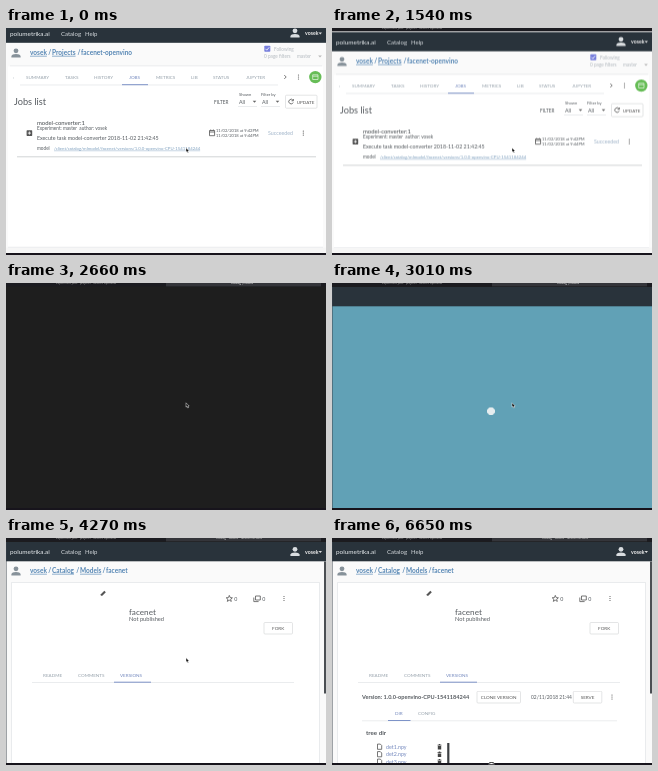
An HTML page for the animation above (6.72 s loop, 320x227 px).

```html
<!DOCTYPE html>
<html lang="en">
<head>
<meta charset="utf-8">
<title>Model catalog</title>
<style>
  html, body { margin: 0; width: 100%; height: 100%; overflow: hidden; background: #1e1e1e; }
  svg { display: block; width: 100vw; height: 100vh; }
  text { font-family: Lato, "Open Sans", sans-serif; font-size: 5.3px; fill: #555a5f; }
  .brand { font-size: 6.4px; fill: #e9edf0; }
  .nav { font-size: 6px; fill: #d5dade; }
  .user { font-size: 5.2px; font-weight: 700; fill: #eee; }
  .crumb { font-size: 6.5px; font-weight: 700; fill: #5586b4; }
  .tab { font-size: 4.6px; fill: #95a0aa; }
  .on { fill: #7287bd; }
  .h1 { font-size: 9.2px; }
  .h2 { font-size: 5.9px; fill: #43484c; }
  .small { font-size: 4.7px; }
  .tiny { font-size: 4.1px; }
  .pale { fill: #b4bac0; }
  .link { font-size: 4.3px; fill: #7fa0bf; text-decoration: underline; }
  .btn { font-size: 4.6px; text-anchor: middle; fill: #555; }
  .title { font-size: 3px; fill: #a5a5a5; }
  .box { fill: #fff; stroke: #d2d4d6; stroke-width: .6; }
  .rule { stroke: #dcdfe2; stroke-width: .6; }
  .ink { stroke: #7e93c8; stroke-width: 1; }
  .line { fill: none; stroke: #555; stroke-width: .8; }

  .t { animation: 6.72s step-end infinite both; }
  .jobs { animation-name: jobs; }
  .shift { animation-name: shift; }
  .strip { animation-name: strip; }
  .newtab { animation-name: newtab; }
  .name1 { animation-name: name1; }
  .name2 { animation-name: name2; }
  .app { animation-name: app; }
  .splash { animation-name: splash; }
  .spin { animation-name: spin; transform-origin: 159px 128px; }
  .load { animation-name: load; }
  .top { animation-name: top; }
  .card { animation-name: card; }
  .version { animation-name: version; }
  .halo { animation-name: halo; }
  .tap { animation-name: tap; }
  .cursor { animation-name: cursor; }
  .edge { animation-name: edge; }

  @keyframes jobs { 0% { opacity: 1 } 23.958%, 100% { opacity: 0 } }
  @keyframes shift { 0% { transform: translateY(-8.5px) } 21.874%, 100% { transform: none } }
  @keyframes strip { 0% { opacity: 0 } 21.874%, 100% { opacity: 1 } }
  @keyframes newtab { 0% { opacity: 0 } 23.958%, 100% { opacity: 1 } }
  @keyframes name1 { 0% { opacity: 0 } 39.583% { opacity: 1 } 55.208%, 100% { opacity: 0 } }
  @keyframes name2 { 0% { opacity: 0 } 55.208%, 100% { opacity: 1 } }
  @keyframes app { 0% { opacity: 0 } 44.791%, 100% { opacity: 1 } }
  @keyframes splash {
    0% { opacity: 1 }
    47.916% { opacity: 1; animation-timing-function: steps(4, jump-end) }
    52.083%, 100% { opacity: 0 }
  }
  @keyframes spin {
    0% { transform: none }
    44.791% { transform: none; animation-timing-function: steps(7, jump-end) }
    52.083%, 100% { transform: rotate(180deg) scale(1.25) }
  }
  @keyframes load { 0% { opacity: 0 } 52.083% { opacity: 1 } 55.208%, 100% { opacity: 0 } }
  @keyframes top {
    0% { opacity: 0 }
    54.166% { opacity: 0; animation-timing-function: steps(3, jump-end) }
    57.291%, 100% { opacity: 1 }
  }
  @keyframes card {
    0% { opacity: 0 }
    55.208% { opacity: 0; animation-timing-function: steps(8, jump-end) }
    63.541%, 100% { opacity: 1 }
  }
  @keyframes version {
    0% { opacity: 0; transform: translateY(10px) }
    67.708% { opacity: 0; transform: translateY(10px); animation-timing-function: steps(10, jump-end) }
    78.125%, 100% { opacity: 1; transform: none }
  }
  @keyframes halo { 0% { opacity: 0 } 8.333% { opacity: .12 } 9.375% { opacity: .22 } 12.5%, 100% { opacity: 0 } }
  @keyframes tap { 0% { opacity: 0 } 19.791% { opacity: .18 } 21.874%, 100% { opacity: 0 } }
  @keyframes cursor {
    0% { transform: none }
    67.708% { transform: none; animation-timing-function: steps(10, jump-end) }
    78.125% { transform: translate(-12px, 104px) }
    79.166%, 100% { transform: translate(-12px, 112px) }
  }
  @keyframes edge { 0% { opacity: 0 } 98.958%, 100% { opacity: 1 } }
</style>
</head>
<body>
<svg viewBox="0 0 320 227" preserveAspectRatio="none">
  <defs>
    <g id="person">
      <circle cy="-2.2" r="2.4"/>
      <path d="M-4.6 4.6V3Q-4 .9 0 .9T4.6 3V4.6Z"/>
    </g>
    <g id="dots" fill="#555"><circle cy="-2" r=".6"/><circle r=".6"/><circle cy="2" r=".6"/></g>
    <path id="down" d="M-1.8-1H1.8L0 1Z" fill="#666"/>
    <g id="bar">
      <rect y="4" width="320" height="19.3" fill="#29333b"/>
    </g>
    <g id="menu">
      <text class="brand" x="4" y="16">polumetrika.ai</text>
      <text class="nav" x="55" y="16">Catalog</text>
      <text class="nav" x="79" y="16">Help</text>
      <use href="#person" x="289" y="13.5" fill="#d9dde0"/>
      <text class="user" x="299" y="15.6">vosek</text>
      <path d="M312.6 13H316L314.3 15Z" fill="#ddd"/>
    </g>
    <g id="file">
      <path class="line" d="M-2-2.6H.8L2.2-1.2V2.6H-2Z"/>
      <path d="M58-2H62V-1.2H58ZM58.3-.7H61.7V2.8H58.3ZM59.2-2.7H60.8V-2H59.2Z" fill="#444"/>
    </g>
  </defs>

  <rect width="320" height="227" fill="#1e1e1e"/>

  <g class="t jobs">
    <rect width="320" height="227" fill="#fafafa"/>
    <g class="t shift">
      <use href="#bar"/><use href="#menu"/>
      <use href="#person" x="10" y="33.5" fill="#87929a"/>
      <text class="crumb" y="35.3"><tspan x="24" text-decoration="underline">vosek</tspan><tspan x="42.3">/</tspan><tspan x="46" text-decoration="underline">Projects</tspan><tspan x="71.5">/</tspan><tspan x="75">facenet-openvino</tspan></text>
      <rect x="258.3" y="26.3" width="6" height="6" rx=".8" fill="#777fdc"/>
      <path d="M259.5 29.3L260.8 30.7 263.2 27.8" fill="none" stroke="#fff" stroke-width=".8"/>
      <text class="small pale" x="268" y="31">Following</text>
      <text class="small pale" x="258" y="38.5">0 page filters</text>
      <text class="small pale" x="291" y="38.5">master</text>
      <use href="#down" x="314" y="37" opacity=".45"/>
      <path class="rule" d="M4 46.5H316"/>
      <rect x="2" y="47" width="315" height="180" fill="#fff"/>
      <g class="tab">
        <text class="tab" x="7" y="59">‹</text>
        <text class="tab" x="20" y="59">SUMMARY</text>
        <text class="tab" x="59" y="59">TASKS</text>
        <text class="tab" x="88" y="59">HISTORY</text>
        <text class="tab on" x="123" y="59">JOBS</text>
        <text class="tab" x="150" y="59">METRICS</text>
        <text class="tab" x="185" y="59">LIB</text>
        <text class="tab" x="207" y="59">STATUS</text>
        <text class="tab" x="240" y="59">JUPYTER</text>
      </g>
      <path class="line" d="M278.3 55.6L280.2 57.5 278.3 59.4"/>
      <use href="#dots" x="292.5" y="57.5"/>
      <circle cx="309.3" cy="57.6" r="6.2" fill="#67bd57"/>
      <path d="M306.7 55.3H312V60H306.7ZM306.7 56.7H312" fill="none" stroke="#e9f7e6" stroke-width=".7"/>
      <path class="rule" d="M14 65.5H272"/><path class="ink" d="M116 65.2H142"/>

      <text class="h1" x="8" y="85">Jobs list</text>
      <text class="small" x="208" y="84">FILTER</text>
      <text class="tiny" x="233" y="76.5">Shown</text>
      <text x="233" y="84">All</text><use href="#down" x="248.5" y="82.3"/>
      <text class="tiny" x="255" y="76.5">Filter by</text>
      <text x="256" y="84">All</text><use href="#down" x="271.5" y="82.3"/>
      <path class="rule" d="M232 87H251M255 87H274"/>
      <rect class="box" x="279.5" y="75.7" width="31.5" height="13" rx="1"/>
      <path class="line" d="M287 80.8A2.3 2.3 0 1 0 287.2 83M287.4 79.5V81.3H285.5"/>
      <text class="btn" x="299.5" y="84">UPDATE</text>

      <text class="h2" x="31" y="105">model-converter:1</text>
      <text class="small" x="31" y="110.3">Experiment: master&#160; author: vosek</text>
      <text x="31" y="120.8">Execute task model-converter 2018-11-02 21:42:45</text>
      <text class="small" x="31" y="130.2">model</text>
      <text class="link" x="48" y="130.2">/client/catalog/mlmodel/facenet/versions/1.0.0-openvino-CPU-1541184244</text>
      <rect x="20.6" y="110.8" width="5.6" height="5.6" rx=".6" fill="#555"/>
      <path d="M23.4 112V115.2M21.8 113.6H25" stroke="#fff" stroke-width=".8"/>
      <path class="line" d="M203.5 111H208.6V116.2H203.5ZM203.5 112.5H208.6M204.7 110V111M207.4 110V111"/>
      <text class="tiny" x="210" y="112.7">11/02/2018 at 9:42PM</text>
      <text class="tiny" x="210" y="117.4">11/02/2018 at 9:44PM</text>
      <text x="262" y="115.2" fill="#9fb3c8" style="fill:#9fb3c8">Succeeded</text>
      <use href="#dots" x="297.3" y="113.6"/>
      <path d="M11 137.3H310" stroke="#c6c9cc" stroke-width=".8"/>
    </g>
    <path class="rule" d="M2 219.3H317"/>
    <rect y="219.7" width="320" height="5" fill="#f6f6f6"/>
    <circle class="t halo" cx="180" cy="120" r="9.5" fill="#555"/>
    <circle class="t tap" cx="180.5" cy="120" r="7" fill="#555"/>
  </g>

  <g class="t app">
    <rect y="4" width="320" height="221" fill="#f0f0f0"/>
    <g class="t top">
      <rect y="23" width="320" height="202" fill="#fafafa"/>
      <use href="#person" x="10" y="33" fill="#87929a"/>
      <text class="crumb" y="34.8"><tspan x="24" text-decoration="underline">vosek</tspan><tspan x="42.3">/</tspan><tspan x="46" text-decoration="underline">Catalog</tspan><tspan x="70.2">/</tspan><tspan x="74" text-decoration="underline">Models</tspan><tspan x="96.5">/</tspan><tspan x="100">facenet</tspan></text>
    </g>
    <g class="t card">
      <rect x="5.5" y="44.5" width="308" height="183" fill="#fff"/>
      <path class="rule" d="M5.5 227V44.5H313.5V227" fill="none"/>
      <path d="M94.8 57.7V56.2L98.3 52.7 99.8 54.2 96.3 57.7Z" fill="#555"/>
      <text x="123" y="77" style="font-size:8.2px">facenet</text>
      <text x="123" y="83.4" style="font-size:5.7px">Not published</text>
      <path class="line" d="M223.3 57.4L224.2 59.6 226.4 59.8 224.7 61.2 225.3 63.4 223.3 62.2 221.3 63.4 221.9 61.2 220.2 59.8 222.4 59.6Z"/>
      <text x="228.3" y="62.5">0</text>
      <path class="line" d="M249.5 58H254.3V62H249.5ZM247.8 59.5V63.6H252.6"/>
      <text x="256.3" y="62.5">0</text>
      <use href="#dots" x="278" y="60.5"/>
      <rect class="box" x="258" y="84.5" width="28.5" height="11.5" rx="1"/>
      <text class="btn" x="272.2" y="92">FORK</text>
      <text class="tab" x="37" y="139">README</text>
      <text class="tab" x="72" y="139">COMMENTS</text>
      <text class="tab on" x="114" y="139">VERSIONS</text>
      <path class="rule" d="M26 144.5H288"/><path class="ink" d="M108 144.2H145"/>
      <rect x="318" y="23.5" width="2" height="132" fill="#4b4f53"/>
    </g>
    <g class="t version">
      <text x="30" y="161" style="font-size:5.6px;font-weight:700">Version: 1.0.0-openvino-CPU-1541184244</text>
      <rect class="box" x="145" y="153.3" width="43.5" height="11.7" rx="1"/>
      <text class="btn" x="166.7" y="161">CLONE VERSION</text>
      <text x="199" y="161" style="font-size:4.9px">02/11/2018 21:44</text>
      <rect class="box" x="241.3" y="153.3" width="28.5" height="11.7" rx="1"/>
      <text class="btn" x="255.5" y="161">SERVE</text>
      <use href="#dots" x="280" y="159"/>
      <text class="tab on" x="63" y="177">DIR</text>
      <text class="tab" x="86" y="177">CONFIG</text>
      <path class="rule" d="M30 182.8H285"/><path class="ink" d="M56 182.5H78.5"/>
      <text x="34" y="197" style="font-size:6.2px;font-weight:700">tree dir</text>
      <use href="#file" x="47.5" y="208.7"/><text class="on" x="54" y="210.7">det1.npy</text>
      <use href="#file" x="47.5" y="216.2"/><text class="on" x="54" y="218.2">det2.npy</text>
      <use href="#file" x="47.5" y="223.7"/><text class="on" x="54" y="225.7">det3.npy</text>
      <rect x="115.2" y="205" width="2.2" height="22" fill="#3c3f42"/>
    </g>
    <g class="t splash">
      <rect y="23" width="320" height="202" fill="#61a1b6"/>
      <path class="t spin" d="M157.3 124.3H160.7L163 126.7V129.6L160.7 132H157.3L155 129.6V126.7Z" fill="#e6edef"/>
    </g>
    <use href="#bar"/>
    <g class="t top"><use href="#menu"/></g>
    <rect class="t load" y="3.5" width="320" height="1.6" fill="#648fb5"/>
    <path d="M.3 4V225" stroke="#39424a" stroke-width=".6"/>
  </g>

  <g class="t strip">
    <rect width="320" height="3.4" fill="#1b1b20"/>
    <text class="title" x="50" y="1.2">Experiment jobs - projects - facenet-openvino</text>
    <g class="t newtab">
      <rect x="160" width="155" height="3.4" fill="#34353a"/>
      <text class="title t name1" x="225" y="1.2" style="fill:#eee">Catalog | Models</text>
      <text class="title t name2" x="210" y="1.2" style="fill:#ccc">Catalog - models - facenet versions</text>
    </g>
  </g>

  <path class="t cursor" d="M180 119.8V124.2L181 123.3 181.8 125 182.6 124.6 181.9 123H183.2Z" fill="#111" stroke="#fff" stroke-width=".45"/>
  <circle class="t edge" cx="159.5" cy="228.7" r="4.2" fill="#fff" stroke="#333"/>
  <rect y="225" width="320" height="2" fill="#17141c"/>
  <path class="t edge" d="M156 226.2Q159.5 222.8 163 226.2" fill="#fff" stroke="#333" stroke-width=".9"/>
</svg>
</body>
</html>
```
